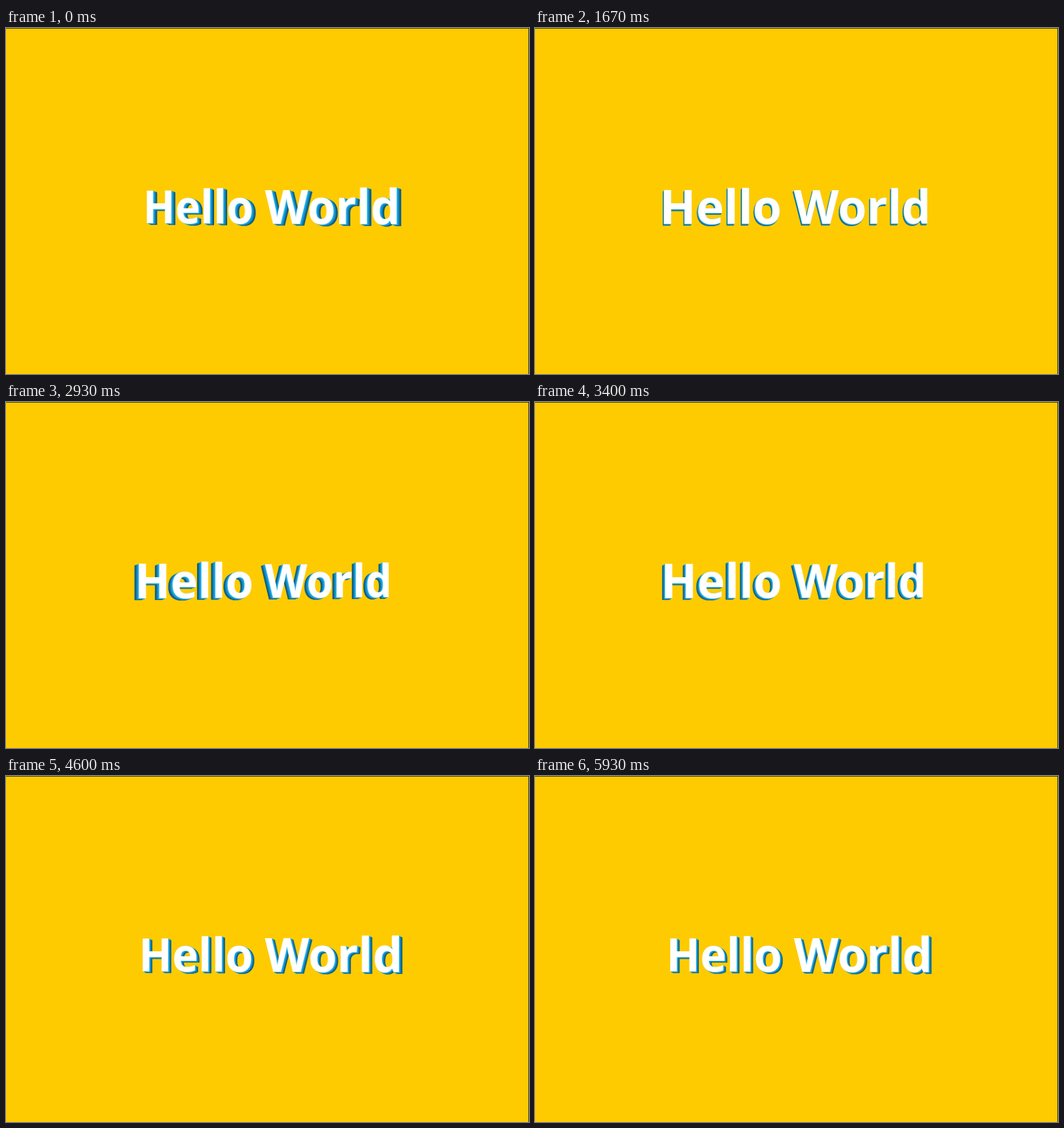
Recreate the animation shown at these times as an HTML page. Size 920x608 px, loop 5.99 s.

```html
<!DOCTYPE html>
<html lang="en">
<head>
<meta charset="utf-8">
<title>Turning text</title>
<style>
  html, body {
    margin: 0;
    width: 100%;
    height: 100%;
    overflow: hidden;
    background: #fecb00;
  }
  .stage {
    position: relative;
    box-sizing: border-box;
    width: 920px;
    height: 608px;
    overflow: hidden;
    border: solid #242018;
    border-width: 1px 1px 0 0;
  }
  h1 {
    position: absolute;
    left: 0;
    top: 261px;
    width: 920px;
    margin: 0;
    font: 700 82.5px/100px "Open Sans", "Noto Sans", sans-serif;
    text-align: center;
    white-space: nowrap;
    color: #fff;
  }
</style>
</head>
<body>
<div class="stage"><h1>Hello World</h1></div>
<script>
  const LOOP = 5990;
  const SWING = 5000;
  const PEAK = 210;      // time of the strongest turn to the right
  const MAX_ANGLE = 20;
  const DEPTH_X = 8;
  const DEPTH_Y = 3;
  const LAYERS = 8;
  const NEAR = [34, 184, 245];
  const FAR = [0, 74, 118];

  const title = document.querySelector("h1");

  // Poses are held for 70, 60 and 70 ms in turn.
  function hold(t) {
    const r = t % 200;
    return t - r + (r < 70 ? 0 : r < 130 ? 70 : 130);
  }

  function layer(i, turn) {
    const k = i / LAYERS;
    const mix = (i - 1) / (LAYERS - 1);
    const rgb = NEAR.map((c, n) => Math.round(c + (FAR[n] - c) * mix));
    const x = (DEPTH_X * turn * k).toFixed(2);
    const y = (DEPTH_Y * k).toFixed(2);
    return `${x}px ${y}px 0 rgb(${rgb})`;
  }

  function draw(now) {
    const t = hold(now % LOOP);
    const turn = Math.cos(2 * Math.PI * (t - PEAK) / SWING);
    title.style.transform = `perspective(2400px) rotateY(${-MAX_ANGLE * turn}deg)`;
    title.style.textShadow = Array.from({ length: LAYERS }, (_, i) => layer(i + 1, turn)).join(",");
  }

  const start = performance.now();
  function tick() {
    draw(performance.now() - start);
    requestAnimationFrame(tick);
  }
  tick();
</script>
</body>
</html>
```
